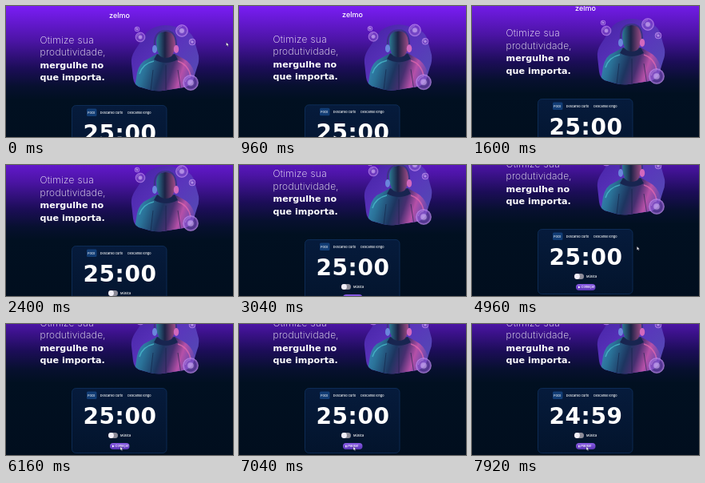
An HTML page for the animation above (8 s loop, 284 by 164 pixels).

```html
<!DOCTYPE html>
<html lang="pt-BR">
<head>
<meta charset="utf-8">
<title>Zelmo</title>
<style>
html, body { margin: 0; width: 100%; height: 100%; overflow: hidden; background: #010e1e; }
svg { display: block; width: 100vw; height: 100vh; }
text { font-family: Inter, "Open Sans", sans-serif; fill: #fff; }
.light { font-size: 12px; font-weight: 200; letter-spacing: .3px; }
.bold, #timer { font-family: "DejaVu Sans", sans-serif; font-weight: 700; }
.bold { font-size: 11.2px; }
.logo { font-size: 9px; font-weight: 500; text-anchor: middle; }
.small { font-size: 3.8px; font-weight: 500; }
#timer { font-size: 28px; letter-spacing: .6px; text-anchor: middle; }
</style>
</head>
<body>
<svg viewBox="0 0 284 164" preserveAspectRatio="none">
  <defs>
    <linearGradient id="sky" x2="0" y2="1">
      <stop offset="0" stop-color="#7a1df5"/>
      <stop offset=".21" stop-color="#4b14a4"/>
      <stop offset=".37" stop-color="#1c0d58"/>
      <stop offset=".48" stop-color="#07102f"/>
      <stop offset=".56" stop-color="#011021"/>
      <stop offset="1" stop-color="#010e1e"/>
    </linearGradient>
    <linearGradient id="blob" x2="1" y2="1">
      <stop offset="0" stop-color="#4520a4"/>
      <stop offset=".5" stop-color="#5a35bc"/>
      <stop offset="1" stop-color="#5150b0"/>
    </linearGradient>
    <linearGradient id="coat" x2="1" y2=".2">
      <stop offset="0" stop-color="#3c8fc4"/>
      <stop offset=".25" stop-color="#2a7298"/>
      <stop offset=".5" stop-color="#1d3560"/>
      <stop offset=".66" stop-color="#472f70"/>
      <stop offset=".82" stop-color="#b650a8"/>
      <stop offset="1" stop-color="#6a48b0"/>
    </linearGradient>
    <linearGradient id="hair">
      <stop offset="0" stop-color="#2c7a94"/>
      <stop offset=".45" stop-color="#1c2245"/>
      <stop offset="1" stop-color="#a04c88"/>
    </linearGradient>
    <radialGradient id="bubble">
      <stop offset="0" stop-color="#a07be0" stop-opacity=".75"/>
      <stop offset=".7" stop-color="#7d48c8" stop-opacity=".6"/>
      <stop offset="1" stop-color="#c08af0" stop-opacity=".8"/>
    </radialGradient>
    <linearGradient id="card" x2="0" y2="1">
      <stop offset="0" stop-color="#061b3c"/>
      <stop offset="1" stop-color="#03142c"/>
    </linearGradient>
    <linearGradient id="pill" x2="0" y2="1">
      <stop offset="0" stop-color="#8a5ce6"/>
      <stop offset="1" stop-color="#5a35b4"/>
    </linearGradient>
    <clipPath id="shape"><path id="outline" d="M188 26Q199 22 212 26L226 31Q234 35 236 44L241 62Q242 70 239 77L234 93Q231 100 222 102L196 106Q188 107 180 105L166 101Q160 98 159 90L157 72Q156 64 161 56L176 33Q181 28 188 26Z"/></clipPath>
  </defs>

  <g id="page">
    <rect width="284" height="210" fill="url(#sky)"/>
    <text class="logo" x="142" y="14.5">zelmo</text>
    <text class="light" x="42.5" y="46.5">Otimize sua</text>
    <text class="light" x="42.5" y="62">produtividade,</text>
    <text class="bold" x="42.5" y="77.5">mergulhe no</text>
    <text class="bold" x="42.5" y="93">que importa.</text>

    <use href="#outline" fill="url(#blob)"/>
    <g clip-path="url(#shape)">
      <path d="M160 108L164 84Q167 70 178 66L189 60H211L222 66Q232 71 236 84L239 108Z" fill="url(#coat)"/>
      <path d="M189 60Q200 68 211 60L215 67Q200 75 185 67Z" fill="#182550"/>
      <path d="M181 106L184 80M219 106L215 80M200 74V106" fill="none" stroke="#122044" stroke-opacity=".6"/>
      <path d="M167 85Q171 72 185 69" fill="none" stroke="#4cc5d2" stroke-width="1.5" stroke-opacity=".7"/>
      <path d="M215 69Q228 73 231 88" fill="none" stroke="#e86bb0" stroke-width="1.5" stroke-opacity=".7"/>
    </g>
    <path d="M188 45Q188 32 200 32T212 46Q212 56 207 63Q200 67 193 63Q188 56 188 45Z" fill="url(#hair)"/>
    <path d="M186 52Q184 32 199 31T213 53" fill="none" stroke="#3c3486" stroke-width="2"/>
    <ellipse cx="186" cy="54" rx="3" ry="5" fill="#6a86dc"/>
    <ellipse cx="213" cy="54" rx="3.2" ry="5" fill="#d268be"/>
    <g id="bubbles" stroke="#c79bf5" stroke-width=".4"></g>

    <rect x="82.5" y="124.5" width="118.5" height="81" rx="5" fill="url(#card)" stroke="#10315f" stroke-width=".8"/>
    <rect x="101" y="128.5" width="12.5" height="9.5" rx="1.5" fill="#123d75"/>
    <text class="small" x="102.3" y="134.7">Foco</text>
    <text class="small" x="117.8" y="134.7">Descanso curto</text>
    <text class="small" x="152.3" y="134.7">Descanso longo</text>
    <text id="timer" x="142.5" y="169">25:00</text>
    <rect x="128" y="180" width="12" height="7" rx="3.5" fill="#8d8c98"/>
    <circle cx="131.5" cy="183.5" r="3.4" fill="#f2eff8"/>
    <text class="small" x="143" y="184.9">Música</text>
    <rect x="130" y="193" width="24.5" height="8" rx="4" fill="url(#pill)"/>
    <path id="icon" fill="#fff"/>
    <text class="small" id="label" x="136.6" y="198.4"></text>
  </g>
  <path id="cursor" d="M0 0V4.6L1.1 3.6L1.9 5.2L2.7 4.8L2 3.3H3.4Z" fill="#fff" stroke="#161630" stroke-width=".35"/>
</svg>
<script>
const LOOP = 8000, CLICK = 6500;
const $ = id => document.getElementById(id);
const clamp = v => Math.min(1, Math.max(0, v));
const ease = u => u * u * (3 - 2 * u);
const scrollKeys = [[900, 0], [1600, 8], [2400, 23], [3680, 39], [4480, 44]];
const bubbles = [[164, 29, 3], [168, 39, 6], [220, 31, 7.5], [233, 45, 4], [231, 96, 9.5]];

$('bubbles').innerHTML = bubbles.map(([x, y, r]) =>
  `<circle cx="${x}" cy="${y}" r="${r}" fill="url(#bubble)"/>
   <circle cx="${x}" cy="${y}" r="${r * .4}" fill="#d5b5f5" fill-opacity=".55" stroke="none"/>
   <path d="M${x - r * .7} ${y - r * .1}Q${x - r * .6} ${y - r * .65} ${x} ${y - r * .75}" fill="none" stroke="#eddcff" stroke-opacity=".8"/>`
).join('');

function scrollAt(t) {
  let y = 0;
  for (let i = 1; i < scrollKeys.length; i++) {
    const [t0, y0] = scrollKeys[i - 1], [t1, y1] = scrollKeys[i];
    y += (y1 - y0) * clamp((t - t0) / (t1 - t0));
  }
  return y;
}

function draw(t) {
  const running = t >= CLICK;
  const move = ease(clamp((t - 4580) / 740));
  $('page').setAttribute('transform', `translate(0 ${-scrollAt(t)})`);
  $('cursor').setAttribute('transform', `translate(${275.5 - 132.5 * move} ${45.5 + 108 * move})`);
  // The pointer is hidden while the page scrolls
  $('cursor').setAttribute('visibility', t > 880 && t < 4580 ? 'hidden' : 'visible');
  $('timer').textContent = t >= CLICK + 1000 ? '24:59' : '25:00';
  $('label').textContent = running ? 'Pausar' : 'Começar';
  $('icon').setAttribute('d', running ? 'M133 195.8h.8v2.6h-.8zM134.6 195.8h.8v2.6h-.8z' : 'M133 195.5L135.6 197L133 198.5Z');
}

const start = performance.now();
function tick() {
  draw((performance.now() - start) % LOOP);
  requestAnimationFrame(tick);
}
tick();
</script>
</body>
</html>
```
